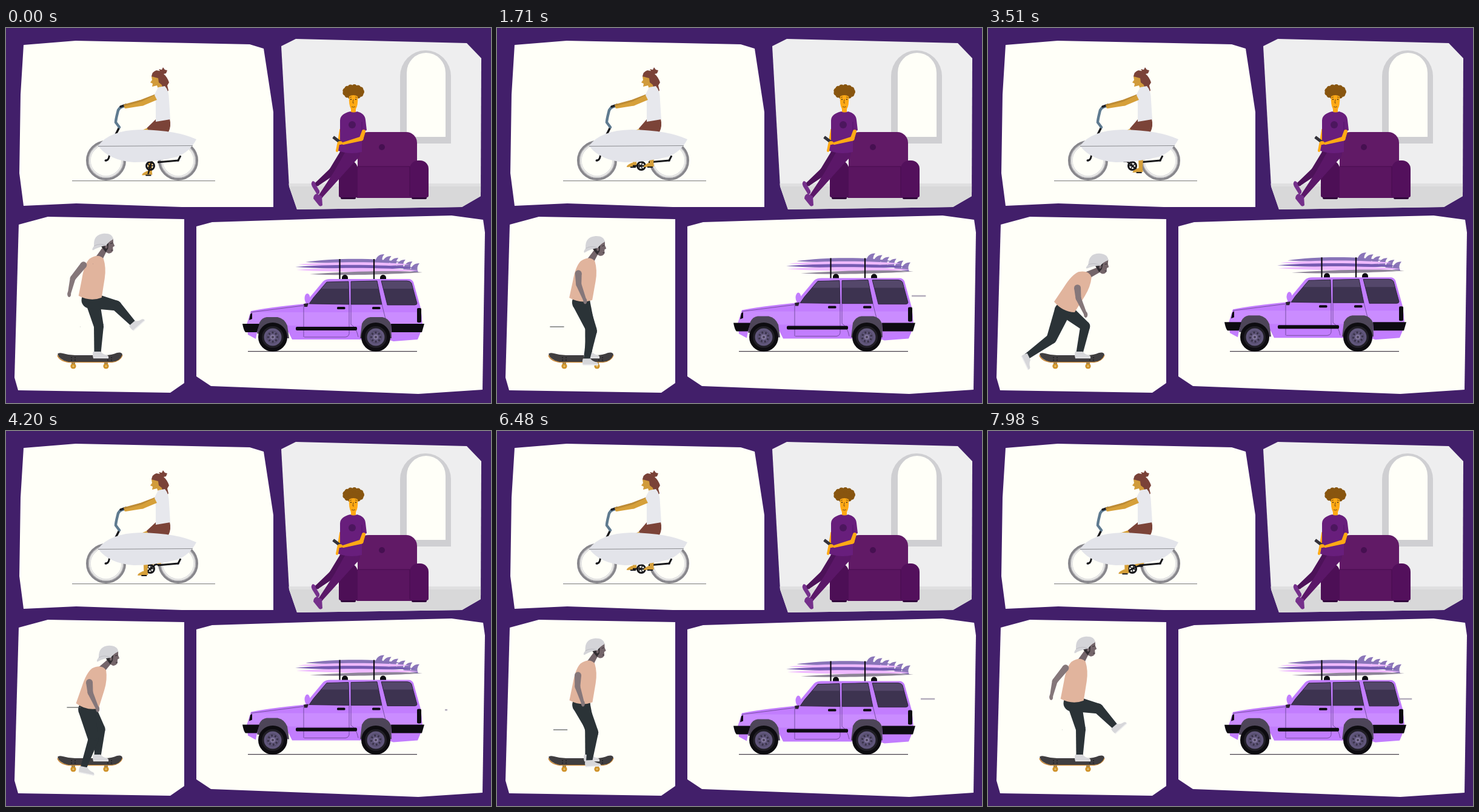
Write an HTML page with a canvas that moves like this. It is 800x620 px and loops after 8 s.

```html
<!DOCTYPE html>
<html lang="en">
<head>
<meta charset="utf-8">
<title>On the move</title>
<style>
html, body { margin: 0; width: 100%; height: 100%; overflow: hidden; background: #421f6a; }
canvas { display: block; width: 800px; height: 620px; }
</style>
</head>
<body>
<canvas id="stage" width="800" height="620"></canvas>
<script>
const c = document.getElementById('stage').getContext('2d');
const { PI, sin, cos, max, min, floor, hypot } = Math;
const LOOP = 8000, PUSH = 798, PEDAL = 954, TAU = PI * 2, RAD = PI / 180;
const CREAM = '#fffff8';

// ---------- helpers ----------
const random = n => { const v = sin(n * 12.9898) * 43758.5453; return v - floor(v); };
const ease = u => (1 - cos(PI * u)) / 2;

function shape(color, d) {
  c.fillStyle = color;
  c.fill(new Path2D(d));
}
function stroke(color, w, d, cap = 'butt') {
  c.strokeStyle = color;
  c.lineWidth = w;
  c.lineCap = cap;
  c.lineJoin = 'round';
  c.stroke(new Path2D(d));
}
function dot(color, x, y, rx, ry = rx) {
  c.fillStyle = color;
  c.beginPath();
  c.ellipse(x, y, rx, ry, 0, 0, TAU);
  c.fill();
}
function ring(color, x, y, r, w) {
  c.strokeStyle = color;
  c.lineWidth = w;
  c.beginPath();
  c.arc(x, y, r, 0, TAU);
  c.stroke();
}
function box(color, x, y, w, h, r = 0) {
  c.fillStyle = color;
  c.beginPath();
  c.roundRect(x, y, w, h, r);
  c.fill();
}
// Tapered limb through points [x, y, width]
function limb(color, ...pts) {
  pts.forEach(([x, y, w], i) => {
    dot(color, x, y, w / 2);
    if (!i) return;
    const [px, py, pw] = pts[i - 1];
    const d = hypot(x - px, y - py) || 1;
    const nx = (py - y) / d / 2, ny = (x - px) / d / 2;
    shape(color, `M${px + nx * pw} ${py + ny * pw}L${x + nx * w} ${y + ny * w}`
      + `L${x - nx * w} ${y - ny * w}L${px - nx * pw} ${py - ny * pw}Z`);
  });
}
function placed(x, y, angle, draw) {
  c.save();
  c.translate(x, y);
  c.rotate(angle * RAD);
  draw();
  c.restore();
}
// Point at a length and an angle from straight down, forward positive
const reach = ([x, y], len, angle) => [x + len * sin(angle * RAD), y + len * cos(angle * RAD)];

// Speed line: grows from x, slides and shrinks away
function streak(age, x, y, dir, color, w) {
  const head = min(52, age * 0.31), tail = max(0, (age - 75) * 0.31);
  if (age > 0 && tail < head) stroke(color, w, `M${x + dir * tail} ${y}L${x + dir * head} ${y}`);
}

// ---------- panels ----------
function panels() {
  c.fillStyle = '#421f6a';
  c.fillRect(0, 0, 800, 620);
  shape(CREAM, 'M29 28L115 21L402 27L425 34L441 139V296H290L116 290L29 294L22 240L24 110Z');
  shape(CREAM, 'M21 325L69 312L294 316V587L271 603L20 599L14 578Z');
  shape(CREAM, 'M314 328L340 321L530 315L735 310L787 317L790 338L786 598L680 605L338 592L314 576Z');
}

// ---------- cyclist ----------
function bikeWheel(x) {
  ring('#dededf', x, 219, 26, 1.5);
  ring('#88878c', x, 219, 31, 4);
  ring('#bdbcc0', x, 219, 28.3, 1.5);
  dot('#77777c', x, 219, 2);
}
function foot([x, y], color) {
  limb(color, [x + 4, 200, 10], [x + 3, y - 5, 6]);
  shape(color, `M${x + 6} ${y - 6}L${x + 7} ${y + 1}L${x - 10} ${y + 2}Q${x - 11} ${y - 1} ${x - 2} ${y - 5}Z`);
}
function cyclist(t) {
  const skin = '#d6a03a', shorts = '#7b4338', hair = '#7a4238', iron = '#17171a', cloth = '#e7e8ed';
  const phase = PI + TAU * (t - 1710) / PEDAL;
  const lift = max(0, cos(phase - 5.76));
  const pedal = a => [238 - 14 * cos(a), 228 + 14 * sin(a)];
  const far = pedal(phase + PI), near = pedal(phase);

  stroke('#8f8f90', 1.2, 'M109 252.7H345');
  bikeWheel(165);
  bikeWheel(284);

  foot(far, skin);
  stroke(iron, 3, 'M250 222L284 219L288 211');
  stroke(iron, 3.5, 'M187 164L180 178');
  stroke(iron, 3, 'M172 205L170 213Q169 219 164 219', 'round');
  stroke('#5f7b90', 4.5, 'M195 129Q185 131 184 140Q181 152 181 156L187 164', 'round');
  stroke('#1d2028', 3.5, 'M189 130L198 127', 'round');
  ring(iron, 238, 228, 6.5, 3);
  for (let i = 0; i < 5; i++) {
    const a = phase + i * TAU / 5;
    stroke(iron, 1.5, `M238 228L${238 - 7 * cos(a)} ${228 + 7 * sin(a)}`);
  }
  stroke(iron, 2.5, `M${far}L${near}`);
  foot(near, skin);
  for (const [x, y] of [far, near]) box(iron, x - 4, y + 1, 9, 2);

  // Thigh, head, torso and arms
  limb(skin, [257, 164, 16], [216 - 8 * lift, 181 - 9 * lift, 10]);
  const sx = 234 - 6 * lift, sy = 166 - 3 * lift;
  shape(shorts, `M247 151L270 150Q273 162 268 172L${sx + 6} ${sy + 9}L${sx} ${sy}Z`);
  shape('#d19b3b', 'M247 76L240 80L241 86L238 90L242 92L241 97L249 95L251 100L259 99L257 84Z');
  shape(hair, 'M240 80Q241 72 248 70L254 71L252 68L257 69L259 65L262 69L266 70L264 75L260 76'
    + 'Q266 81 269 90L266 95L268 103L265 108Q258 101 257 94L252 90L251 83Z');
  limb('#bd8b35', [249, 112, 7], [222, 122, 6], [196, 128, 4]);
  shape(cloth, 'M251 98L262 96Q269 103 269 120L271 151L247 155L247 127L246 108Z');
  limb(skin, [249, 114, 9], [225, 125, 7], [197, 131, 4]);
  shape(cloth, 'M248 104Q257 101 257 111L251 123L245 111Z');

  // Carried surfboard
  shape('#e3e4ea', 'M152 195Q170 169 222 168Q282 169 314 184Q303 205 282 213Q245 222 211 222Q170 219 152 195Z');
  stroke('#8c8d91', 1, 'M152 195.5L308 194.5');
}

// ---------- room ----------
function room() {
  c.save();
  c.clip(new Path2D('M478 18L760 25L784 50L783 278L752 296L480 300L467 262L454 30Z'));
  box('#eeeeef', 450, 10, 340, 295);
  box('#d8d8d9', 450, 257, 340, 50);
  box('#dfdfe0', 450, 257, 340, 5);
  shape('#cfcfd2', 'M650 191V80A42 43 0 0 1 734 80V191Z');
  shape(CREAM, 'M661 180V74A32 33 0 0 1 725 74V180Z');
  c.restore();

  // Armchair
  for (const x of [552, 669]) box('#30083b', x, 272, 25, 11, 2);
  box('#611a66', 580, 172, 98, 82, [18, 18, 0, 0]);
  box('#5a1560', 577, 229, 94, 52, 3);
  box('#4d0f56', 549, 219, 31, 61, [14, 14, 3, 3]);
  box('#53105c', 666, 219, 31, 61, [14, 14, 3, 3]);
  stroke('#470d4f', 1, 'M580 229H666V278');
  dot('#461051', 620, 197, 5);

  // Legs and shoes
  const shoe = '#75308b';
  limb('#4d1259', [560, 210, 21], [539, 237, 13], [513, 258, 7]);
  limb('#5b1768', [572, 207, 24], [546, 243, 14], [519, 278, 7]);
  shape(shoe, 'M506 253Q511 254 511 259L517 269Q518 275 513 275L505 262Q502 256 506 253Z');
  shape(shoe, 'M512 274L521 278L522 293Q518 297 515 292L507 282Q507 276 512 274Z');

  // Upper body
  const skin = '#ffa915', curls = '#88550f';
  limb(skin, [553, 169, 6], [550, 185, 5], [546, 203, 4]);
  box(skin, 569, 128, 8, 15);
  shape('#681e7c', 'M568 138Q573 141 579 138Q592 141 593 152L595 169L587 172V205Q567 210 548 203L551 187V153Q551 142 568 138Z');
  stroke('#54156a', 1, 'M587 155V173');
  limb(skin, [590, 171, 6], [586, 183, 7], [556, 191, 4]);
  placed(546, 185, 37, () => box('#34333b', -8, -2.5, 16, 5, 1));
  dot(skin, 551, 190, 4, 3);
  dot('#4c165e', 571, 160, 6);

  dot(curls, 573, 105, 14, 9);
  for (let i = 0; i < 13; i++) {
    const a = i * TAU / 13;
    dot(curls, 573 + 13.5 * cos(a), 105.5 + 8 * sin(a), 4.5);
  }
  shape(skin, 'M566 113Q573 109 580 113Q581 128 577 134Q573 139 569 134Q565 126 566 113Z');
  stroke('#5b3914', 0.8, 'M567 115L570 114M576 114L579 115M573 118L572 124H574M570 130Q573 132 576 130');
  for (const x of [569, 577]) dot('#2d2020', x, 118, 0.9);
}

// ---------- skater ----------
// Leg swing: kick ahead, step down, brush past the board, push far back
const SWING = [[0, 59], [0.14, 5], [0.26, -4], [0.5, -58], [1, 59]];
function swingAt(p) {
  const i = SWING.findIndex(k => k[0] > p);
  const [p0, a0] = SWING[i - 1], [p1, a1] = SWING[i];
  return a0 + (a1 - a0) * ease((p - p0) / (p1 - p0));
}
function shoe(x, y, angle) {
  placed(x, y, angle, () => {
    shape('#d7d7da', 'M-6 -4L6 -4Q10 1 17 2Q20 4 19 7L-6 7Q-8 1 -6 -4Z');
    stroke('#efeff0', 1.5, 'M-6 6.5H19');
  });
}
function skateboard() {
  for (const x of [111, 165]) {
    box('#8f8060', x - 3, 551, 6, 6);
    dot('#cf932c', x, 559, 4.6);
    dot('#e8c675', x, 559, 1.6);
  }
  stroke('#c98633', 1.6, 'M85 541Q88 550 103 552.5H175Q188 551 192 541');
  shape('#403e40', 'M85 539Q87 536 94 538Q104 541 114 541H163Q174 541 183 537Q191 535 192 540Q188 551 175 552H103Q88 549 85 539Z');
  for (const x of [108, 114, 168, 174])
    for (const y of [545, 549]) dot('#1d1c1e', x, y, 0.9);
}
function head(x, y, tilt) {
  placed(x, y, tilt, () => {
    shape('#74656a', 'M2 0L17 -4V3L19 8L16 10V16Q13 21 8 20L1 16Z');
    shape('#302c30', 'M-5 6L9 3L8 12L4 18L1 14Z');
    dot('#74656a', 5, 9, 2, 3);
    stroke('#383238', 1, 'M12 4L16 3M13 15H16');
    shape('#d4d4d8', 'M-15 7Q-16 -12 2 -13Q16 -13 17 -3Q9 1 5 7Q-6 8 -17 14Q-20 13 -15 7Z');
    stroke('#bcbcc2', 1, 'M-15 7Q-5 2 5 7');
  });
}
function skater(t) {
  const pants = '#2b3337', skin = '#85777a';
  const p = t % PUSH / PUSH;
  const crouch = ease(2 * p), fold = crouch ** 2;   // deepest at mid push
  const back = (1 - crouch) ** 12;                  // arm thrown back with the kick
  const lean = 9 + 28 * fold;

  const hip = [140 - 18 * fold, 449 + 19 * crouch];
  const neck = reach(hip, -70, -lean);
  const skull = [neck[0] + 9 + 12 * fold, neck[1] - 27 + 7 * fold];
  const shoulder = [neck[0] - 10 - 8 * sin(TAU * p) - 13 * back, neck[1] + 23 - 11 * back];
  const elbow = reach(shoulder, 17 + 11 * back, 5 - 44 * back);
  const hand = reach(elbow, 30 - 3 * back, 24 - 37 * back);

  const swing = swingAt(p), s = swing * RAD;
  const length = 100 - 21 * max(0, sin(s));
  const ankle = reach(hip, length, swing);
  const [mx, my] = reach(hip, length / 2, swing);
  const knee = [mx + 13 * cos(s), my - 13 * sin(s)];

  skateboard();
  limb(pants, [hip[0] + 2, hip[1], 24], [153 + 9 * fold, 493, 16], [151, 537, 11]);
  shoe(150, 539, 0);
  limb(pants, [hip[0] - 2, hip[1] + 1, 27], [...knee, 17], [ankle[0], ankle[1] - 2, 10]);
  shoe(...ankle, 6 - 1.25 * swing + 0.0075 * swing ** 2);

  limb('#74656a', [skull[0] + 2, skull[1] + 14, 9], [neck[0] + 2, neck[1] + 2, 12]);
  placed(...neck, lean, () => shape('#e1b49d',
    'M-13 4Q0 -8 10 0Q17 14 17 32V64Q0 74 -21 67L-20 39Q-20 14 -13 4Z'));
  limb(skin, [...shoulder, 11], [...elbow, 9], [...hand, 5]);
  dot(skin, ...hand, 3, 5);
  head(...skull, -2 + 9 * fold);

  const line = '#54585a';
  streak(t % (2 * PUSH), 123, 494, -1, line, 1.2);
  const beat = 1365, n = floor(t / beat);
  streak(t % beat, 125 + 50 * random(n + 4), 390 + 120 * random(n), -1, line, 1.2);
}

// ---------- car ----------
function roofBoard(color, x0, y0, x1, y1, up, down) {
  const a = x0 + (x1 - x0) * 0.3, b = x0 + (x1 - x0) * 0.75;
  shape(color, `M${x0} ${y0}C${a} ${y0 - up} ${b} ${y1 - up} ${x1} ${y1}C${b} ${y1 + down} ${a} ${y0 + down} ${x0} ${y0}Z`);
}
function carWheel(x, t) {
  dot('#0d0c10', x, 511, 24);
  dot('#201e25', x, 511, 18);
  dot('#61577c', x, 511, 14.5);
  ring('#4d4563', x, 511, 10, 1);
  placed(x, 511, -t * 0.72, () => {
    for (let i = 0; i < 8; i++) dot('#393348', 7.5 * cos(i * TAU / 8), 7.5 * sin(i * TAU / 8), 1.7);
  });
  dot('#857a9f', x, 511, 4);
  dot('#494057', x, 511, 2);
}
function roofLoad(black) {
  for (let i = 0; i < 6; i++) {
    const x = 609 + i * 11.6, y = 387 + i * 3;
    shape('#8b76b9', `M${x} ${y}Q${x + 2} ${y - 13} ${x + 15} ${y - 13}Q${x + 9} ${y - 6} ${x + 13} ${y + 2}Z`);
  }
  roofBoard('#8874b8', 494, 387, 652, 387, 7, 3);
  roofBoard('#efb9ff', 482, 391, 666, 391, 5, 4);
  roofBoard('#765bb2', 477, 395, 676, 396, 5, 4);
  roofBoard('#efb9ff', 479, 400, 682, 401, 5, 4);
  roofBoard('#8d8497', 501, 407, 687, 404, 4, 3);
  for (const x of [559, 622]) box(black, x - 5, 408, 10, 8, [5, 5, 0, 0]);
  stroke(black, 2.2, 'M550.5 382V416M607 382V416');
}
function carBody(black) {
  const paint = '#c27dfe', glass = '#3d3350', tint = '#54476a', arch = '#4d4558';
  shape(paint, 'M404 468Q432 462 493 456L498 449L523 419Q527 415 535 415H664Q669 415 672 420L684 463L687 492'
    + 'L684 503L679 515L639 518L630 515H472L466 503H414L412 514L399 507L397 490Z');
  shape('#ca8cff', 'M404 470H685L687 492H398Z');

  const windows = 'M500 456L507 446L529 420L565 419L566 457ZM569 419L612 418L620 457H569Z'
    + 'M619 418H661Q667 418 669 422L678 455Q678 458 674 458H629Z';
  shape(glass, windows);
  c.save();
  c.clip(new Path2D(windows));
  box(tint, 495, 415, 190, 16);
  c.restore();
  stroke('#241c31', 0.8, windows);

  // Seams, trim and lights
  stroke('#64418b', 0.8, 'M404 470L490 459M491 457V511M566 457V502Q567 510 560 511H492M569 457V490Q578 495 581 511M620 457L628 489');
  box(black, 478, 494, 101, 6, 2);
  for (const x of [546, 604]) box(black, x, 461, 13.5, 4, 1.5);
  dot(paint, 497, 447, 4.5, 8);
  shape('#29212f', 'M491 456L499 455L497 461H492Z');
  shape(black, 'M401 483L403 473L406 471V481Z');
  box(black, 678, 463, 7, 24, 2);

  // Arches and bumpers
  shape(arch, 'M414 505L418 487Q422 479 430 478H448Q459 480 464 492L467 513H450Z');
  shape(arch, 'M584 513L587 489Q592 479 601 478H621Q631 480 635 490L636 513Z');
  shape(black, 'M390 489H418L414 503H395Q392 500 390 489Z');
  shape(black, 'M635 489H690L686 503H636Z');
}
function car(t) {
  const black = '#0d0b11';
  const beat = 787, since = t - 36, n = floor(since / beat);
  if (n >= 0) streak(since % beat, 676, 443 + 40 * random(n) * (n % 2), 1, '#b3acbb', 2.5);
  stroke('#47414b', 1.3, 'M399 534.6H678');

  c.save();
  c.translate(0, -1.9 + 1.9 * cos(TAU * t / PEDAL));
  roofLoad(black);
  carBody(black);
  c.restore();
  carWheel(440, t);
  carWheel(610, t);
}

// ---------- playback ----------
const begin = performance.now();
function frame() {
  const t = (performance.now() - begin) % LOOP;
  panels();
  cyclist(t);
  room();
  skater(t);
  car(t);
  requestAnimationFrame(frame);
}
frame();
</script>
</body>
</html>
```
